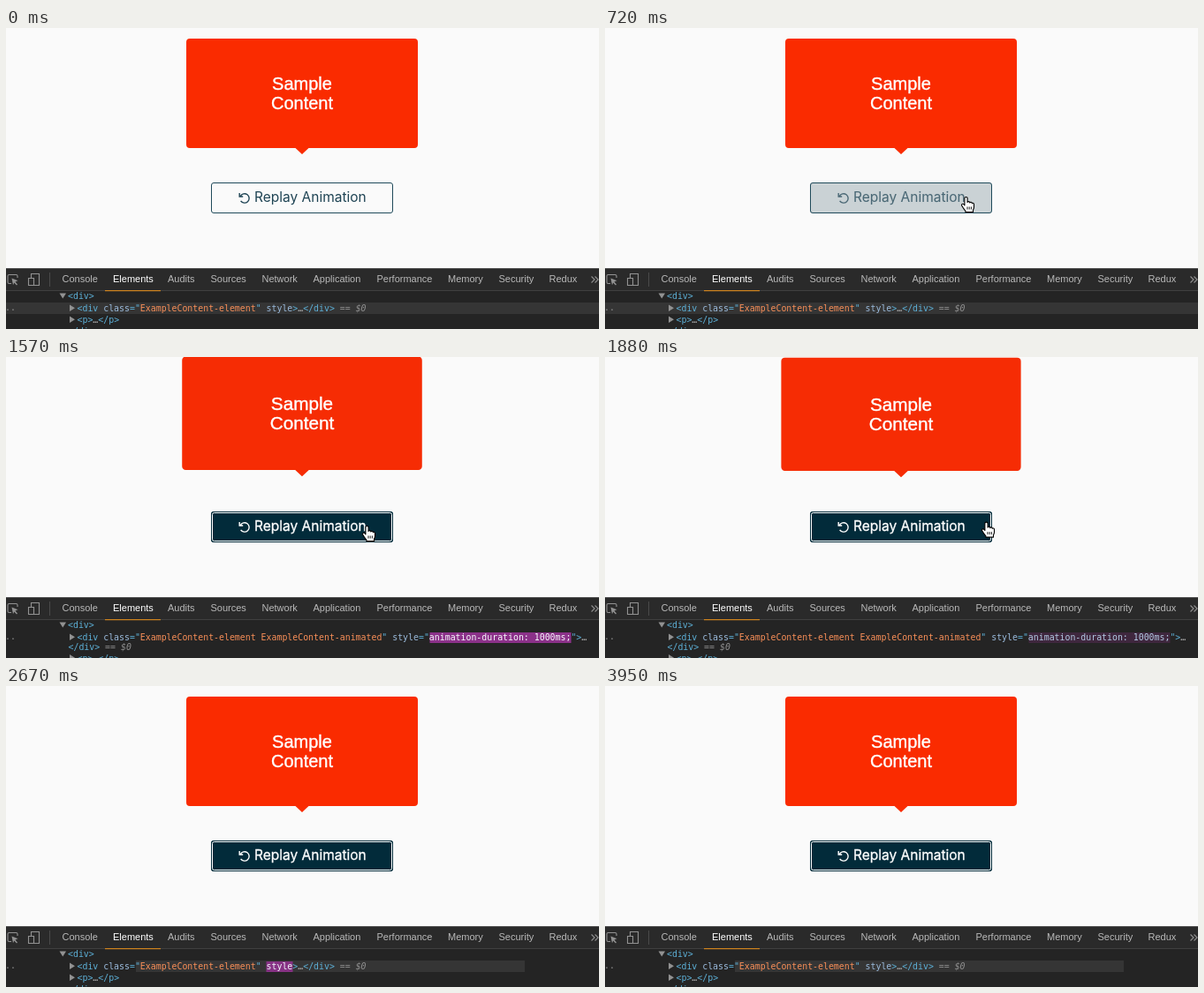
These frames come from a looping animation (671 by 341 pixels, 4280 ms). An HTML page:

```html
<!DOCTYPE html>
<html lang="en">
<head>
<meta charset="utf-8">
<title>Replay animation</title>
<style>
  html, body { margin: 0; width: 100%; height: 100%; overflow: hidden; background: #fafafa; }
  svg { display: block; width: 671px; height: 341px; }
  text { white-space: pre; }
  .sample { font: 20px "Liberation Sans", Arial, sans-serif; text-anchor: middle; fill: #fff; stroke: #fff; stroke-width: .4; }
  .label { font: 15.5px Inter, sans-serif; }
  .tabs { font: 11px "Liberation Sans", Arial, sans-serif; fill: #b9b9b9; }
  .code { font: 9.88px "DejaVu Sans Mono", monospace; fill: #5db0d7; }
  .attr { fill: #9bbbdc; }
  .val { fill: #f98f58; }
  .dim { fill: #8f8f8f; }
  .more { fill: #b5b5b5; }
  .it { font-style: italic; }
  .icon { fill: none; stroke: #929292; stroke-width: 1.1; }
</style>
</head>
<body>
<svg viewBox="0 0 671 341">
  <rect width="671" height="341" fill="#fafafa"/>

  <g id="tip">
    <path id="bubble" d="M208 12H462a4 4 0 0 1 4 4V132a4 4 0 0 1-4 4H342.5L335 143 327.5 136H208a4 4 0 0 1-4-4V16a4 4 0 0 1 4-4Z"/>
    <text class="sample" x="335" y="70">Sample</text>
    <text class="sample" x="335" y="92">Content</text>
  </g>

  <rect id="fill" x="232" y="175" width="206" height="35" rx="3" fill="#022b3a"/>
  <rect id="edge" x="232.5" y="175.5" width="205" height="34" rx="2.5" fill="none" stroke="#1f4a5a"/>
  <rect id="ring" x="233.5" y="176.5" width="203" height="32" rx="2" fill="none" stroke="#fff"/>
  <g id="label">
    <path d="M265.3 190.6A5.2 5.2 0 1 1 265.6 195.8M264.2 187V191H268.2" fill="none" stroke="currentColor" stroke-width="1.4"/>
    <text class="label" x="281" y="197" fill="currentColor" stroke="currentColor">Replay Animation</text>
  </g>

  <rect y="272" width="671" height="69" fill="#242424"/>
  <rect y="272" width="671" height="26" fill="#2a2a2a"/>
  <rect y="272" width="671" height="1" fill="#505050"/>
  <rect y="297" width="671" height="1" fill="#404040"/>
  <rect x="112" y="297" width="63" height="1.2" fill="#d0841f"/>
  <rect x="49" y="277" width="1" height="16" fill="#4a4a4a"/>
  <g class="icon">
    <path d="M6 289.5H3.500Q2 289.500 2 288V281Q2 279.500 3.500 279.500H11.500Q13 279.500 13 281V283"/>
    <path d="M6.500 283.500L13.500 286.300 10.500 287.500 13 290.500 12 291.500 9.300 288.600 8 291.200Z" fill="#929292" stroke="none"/>
    <path d="M28.500 283V278.500H37.500V291.500H32M25.500 283.500H31.500V291.500H25.500Z"/>
    <path d="M662.500 281.500L666 285 662.500 288.500M666.500 281.500L670 285 666.500 288.500"/>
  </g>
  <g id="tabs" class="tabs"></g>

  <rect id="row" y="311" height="13" fill="#353535"/>
  <rect id="flash" y="312" height="12" fill="#933291"/>
  <text class="code dim" x="-7" y="320">...</text>
  <path d="M60.500 300.500H68L64.250 306.500Z" fill="#929292"/>
  <text class="code" x="70" y="307">&lt;div&gt;</text>
  <path d="M72 313.500V321L78 317.250Z" fill="#929292"/>

  <g id="plain" class="code">
    <text x="80.500" y="321">&lt;div <tspan class="attr">class</tspan>="<tspan class="val">ExampleContent-element</tspan>" <tspan id="styleName" class="attr">style</tspan>&gt;<tspan class="more">…</tspan>&lt;/div&gt;<tspan class="dim"> == <tspan class="it">$0</tspan></tspan></text>
    <path d="M72 326.500V334L78 330.250Z" fill="#929292"/>
    <text x="80.500" y="334">&lt;p&gt;<tspan class="more">…</tspan>&lt;/p&gt;</text>
    <text x="70" y="347">&lt;/div&gt;</text>
  </g>
  <g id="active" class="code">
    <text x="80.500" y="321">&lt;div <tspan class="attr">class</tspan>="<tspan class="val">ExampleContent-element ExampleContent-animated</tspan>" <tspan class="attr">style</tspan>="<tspan id="styleValue">animation-duration: 1000ms;</tspan>"&gt;<tspan class="more">…</tspan></text>
    <text x="70.500" y="332">&lt;/div&gt;<tspan class="dim"> == <tspan class="it">$0</tspan></tspan></text>
    <path d="M72 337V344.500L78 340.750Z" fill="#929292"/>
    <text x="80.500" y="344.500">&lt;p&gt;<tspan class="more">…</tspan>&lt;/p&gt;</text>
  </g>

  <g id="cursor">
    <path id="arrow" d="M0 0V14.500L3.300 11.400 5.400 16.200 7.600 15.200 5.600 10.600H10Z" fill="#000" stroke="#fff"/>
    <g id="hand" stroke="#000" stroke-width="1.1" stroke-linejoin="round">
      <path d="M-1.600 1.600Q-1.600 0 0 0T1.600 1.600V6Q1.800 5 3 5.100T4.300 6.500Q4.700 5.600 5.700 5.800T6.800 7.200Q7.300 6.600 8.200 7T9 8.500V11.500Q9 13 8 14.500V17H-.6V15.600Q-2 14.200-3.200 12.200L-5 9.400Q-5.200 8-3.900 7.800T-1.600 9.400Z" fill="#fff"/>
      <path d="M1.500 11V14M3.700 11V14M5.900 11V14" fill="none" stroke-width=".9"/>
    </g>
  </g>
</svg>
<script>
const LOOP = 4280;
const $ = id => document.getElementById(id);
const set = (id, attrs) => {
  for (const k in attrs) $(id).setAttribute(k, attrs[k]);
};
const show = (id, on) => { $(id).style.display = on ? '' : 'none'; };
const clamp = x => Math.min(1, Math.max(0, x));
const ramp = (t, a, b) => clamp((t - a) / (b - a));
const mix = (a, b, p) => a + (b - a) * p;
const mixRgb = (a, b, p) => `rgb(${a.map((v, i) => Math.round(mix(v, b[i], p)))})`;

const tabs = [['Console', 63.5], ['Elements', 121], ['Audits', 183], ['Sources', 231.5],
  ['Network', 289.5], ['Application', 347.5], ['Performance', 419.5], ['Memory', 500],
  ['Security', 557.5], ['Redux', 614.5]];
for (const [name, x] of tabs) {
  const el = document.createElementNS('http://www.w3.org/2000/svg', 'text');
  el.textContent = name;
  el.setAttribute('x', x);
  el.setAttribute('y', 288);
  if (name === 'Elements') el.setAttribute('fill', '#fff'), el.style.fill = '#fff';
  $('tabs').append(el);
}

// The screen refreshes in bursts: [first, last, count]
const bursts = [[0, 0, 1], [230, 720, 9], [780, 890, 3], [1190, 1710, 8], [1800, 2190, 6],
  [2370, 2370, 1], [2580, 3070, 8], [3130, 3190, 2], [3370, 3370, 1], [3540, 3540, 1], [3950, 3950, 1]];
const ticks = bursts.flatMap(([a, b, n]) =>
  Array.from({ length: n }, (_, i) => a + (n > 1 ? (b - a) * i / (n - 1) : 0)));
const held = t => ticks.filter(k => k <= t + 0.01).pop();

// Pointer path: [time, x, y]
const path = [[230, 604, 114], [300, 570, 130], [380, 518, 155], [460, 470, 174], [540, 440, 183],
  [598, 427, 186], [660, 414, 190], [720, 408.5, 191.5], [1790, 408.5, 191.5], [1880, 432, 187],
  [1960, 500, 172], [2040, 590, 150], [2120, 651, 136], [2189, 690, 128]];

function pointer(t) {
  const i = path.findIndex(p => p[0] > t);
  if (i < 1) return null;
  const [a, b] = [path[i - 1], path[i]];
  const p = ramp(t, a[0], b[0]);
  return [mix(a[1], b[1], p), mix(a[2], b[2], p)];
}

function drawTip(t) {
  const p = ramp(t, 1240, 2190);
  let scale = 1, y = 0, alpha = 1;
  if (p > 0 && p < 0.52) {
    const e = 1 - (1 - p / 0.52) ** 3;
    scale = mix(0.82, 1.046, e);
    y = mix(30, -12, e);
    alpha = clamp(e * 1.06);
  } else if (p >= 0.52) {
    const q = (p - 0.52) / 0.48;
    const e = q * q * (3 - 2 * q);
    scale = mix(1.046, 1, e);
    y = mix(-12, 0, e);
  }
  set('tip', { transform: `translate(335 ${74 + y}) scale(${scale}) translate(-335 -74)`, opacity: alpha });
  set('bubble', { fill: t > 1240 && t < 2370 ? '#f62c04' : '#fa2b00' });
}

function drawButton(t) {
  const hover = ramp(t, 680, 890);
  const focus = ramp(t, 1170, 1260);
  set('fill', { opacity: hover });
  set('edge', { stroke: mixRgb([31, 74, 90], [2, 43, 58], focus) });
  set('ring', { opacity: focus });
  $('label').style.color = mixRgb([31, 68, 84], [255, 255, 255], hover);
  set('label', { 'stroke-width': 0.3 * hover });
}

function drawCode(t) {
  const active = t >= 1540 && t < 2580;
  const after = t >= 2580;
  show('active', active);
  show('plain', !active);
  show('row', !active);
  set('row', after ? { x: 147, width: 440 } : { x: 0, width: 671 });
  const glow = active ? (1 - ramp(t, 1540, 2390)) ** 2.8
    : after ? (1 - ramp(t, 2580, 3980)) ** 2.8 : 0;
  set('flash', { x: active ? 479.5 : 294.5, width: active ? 160 : 30, opacity: glow });
  const ink = mixRgb([155, 187, 220], [255, 255, 255], glow);
  $('styleValue').style.fill = ink;
  $('styleName').style.fill = ink;
}

function drawCursor(t) {
  const pos = pointer(t);
  show('cursor', pos);
  if (!pos) return;
  const [x, y] = pos;
  const over = x > 232 && x < 438 && y > 175 && y < 210;
  set('cursor', { transform: `translate(${x} ${y})` });
  show('hand', over);
  show('arrow', !over);
}

const start = performance.now();
function frame() {
  const t = held((performance.now() - start) % LOOP);
  drawTip(t);
  drawButton(t);
  drawCode(t);
  drawCursor(t);
  requestAnimationFrame(frame);
}
frame();
</script>
</body>
</html>
```
